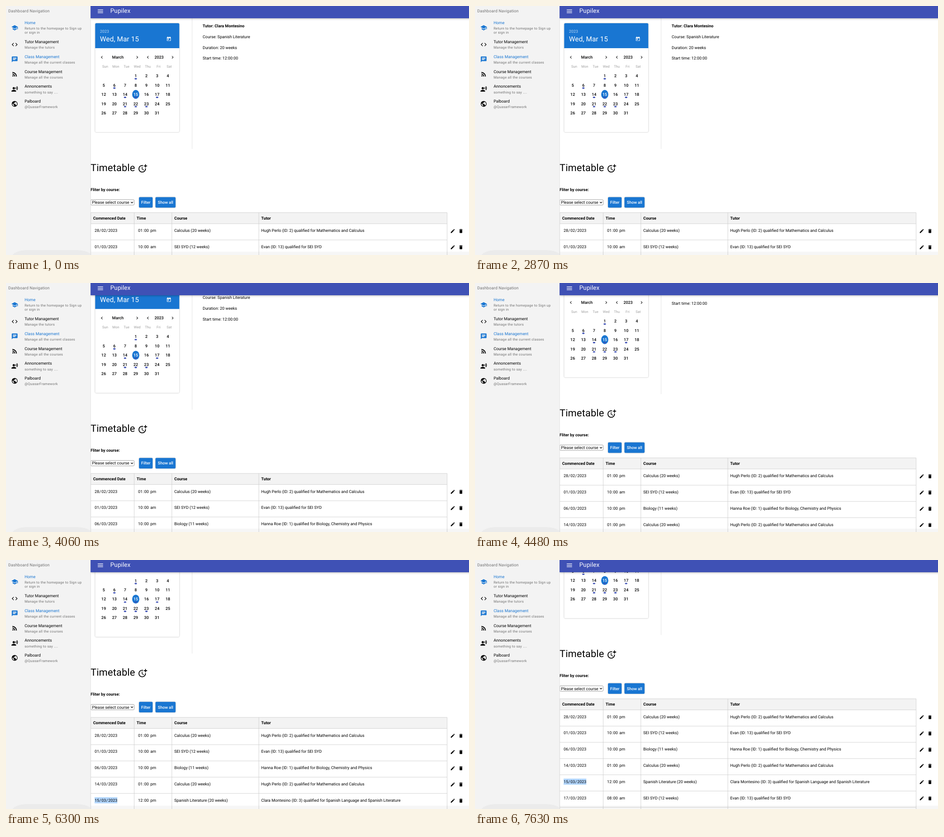
An HTML page for the animation above (8 s loop, 1020 by 549 pixels).

```html
<!DOCTYPE html>
<html lang="en">
<head>
<meta charset="utf-8">
<title>Timetable dashboard</title>
<style>
html, body { margin: 0; width: 100%; height: 100%; overflow: hidden; background: #fff; }
svg { display: block; width: 100vw; height: 100vh; }
text { font: 8.93px Roboto, Arial, sans-serif; white-space: pre; text-rendering: geometricPrecision; }
.bold { font-weight: 700; }
.medium { font-weight: 500; }
.mid { text-anchor: middle; }
.label { letter-spacing: .16px; fill-opacity: .54; }
.caption { font-size: 7.65px; letter-spacing: .255px; fill-opacity: .54; }
.weekday { font-size: 7.65px; fill-opacity: .38; }
.date { font-size: 15.31px; letter-spacing: .11px; }
.brand { font-size: 13.4px; letter-spacing: .13px; }
.title { font-size: 21.7px; letter-spacing: .16px; }
.mark { fill: rgba(128, 188, 254, .6); }
.card { filter: drop-shadow(0 .9px 1.1px rgba(0, 0, 0, .34)); }
.bar { filter: drop-shadow(0 1.2px 2px rgba(0, 0, 0, .3)); }
</style>
</head>
<body>
<svg id="stage" viewBox="0 0 1020 549" preserveAspectRatio="none"></svg>
<script>
const BLUE = '#1976d2', INDIGO = '#3f51b5', LINE = '#c9c9c9', PANEL = '#f3f3f3';
const LOOP = 8000, FRAME = 70;

const ICONS = {
  menu: 'M3 18h18v-2H3zm0-5h18v-2H3zm0-7v2h18V6z',
  school: 'M5 13.18v4L12 21l7-3.82v-4L12 17zM12 3L1 9l11 6 9-4.91V17h2V9z',
  code: 'M9.4 16.6L4.8 12l4.6-4.6L8 6l-6 6 6 6zm5.2 0l4.6-4.6-4.6-4.6L16 6l6 6-6 6z',
  chat: 'M20 2H4c-1.1 0-2 .9-2 2v18l4-4h14c1.1 0 2-.9 2-2V4c0-1.1-.9-2-2-2zM6 9h12v2H6zm8 5H6v-2h8zm4-6H6V6h12z',
  feed: 'M4 17.8a2.2 2.2 0 1 0 4.4 0a2.2 2.2 0 1 0-4.4 0zM4 4.44v2.83c7.03 0 12.73 5.7 12.73 12.73h2.83C19.56 11.4 12.6 4.44 4 4.44zm0 5.66v2.83c3.9 0 7.07 3.17 7.07 7.07h2.83c0-5.47-4.43-9.9-9.9-9.9z',
  voice: 'M5 9a4 4 0 1 0 8 0a4 4 0 1 0-8 0zM9 15c-2.67 0-8 1.34-8 4v2h16v-2c0-2.66-5.33-4-8-4zm7.76-9.64l-1.68 1.69c.84 1.18.84 2.71 0 3.89l1.68 1.69c2.02-2.02 2.02-5.07 0-7.27zM20.07 2l-1.63 1.63c2.77 3.02 2.77 7.56 0 10.74L20.07 16c3.9-3.89 3.91-9.95 0-14z',
  globe: 'M12 2C6.48 2 2 6.48 2 12s4.48 10 10 10 10-4.48 10-10S17.52 2 12 2zm-1 17.93c-3.95-.49-7-3.85-7-7.93 0-.62.08-1.21.21-1.79L9 15v1c0 1.1.9 2 2 2zm6.9-2.54c-.26-.81-1-1.39-1.9-1.39h-1v-3c0-.55-.45-1-1-1H8v-2h2c.55 0 1-.45 1-1V7h2c1.1 0 2-.9 2-2v-.41c2.93 1.19 5 4.06 5 7.41 0 2.08-.8 3.97-2.1 5.39z',
  edit: 'M3 17.25V21h3.75L17.81 9.94l-3.75-3.75zM20.71 7.04c.39-.39.39-1.02 0-1.41l-2.34-2.34c-.39-.39-1.02-.39-1.41 0l-1.83 1.83 3.75 3.75z',
  trash: 'M6 19c0 1.1.9 2 2 2h8c1.1 0 2-.9 2-2V7H6zM19 4h-3.5l-1-1h-5l-1 1H5v2h14z',
  prev: 'M15.41 7.41L14 6l-6 6 6 6 1.41-1.41L10.83 12z',
  next: 'M10 6L8.59 7.41 13.17 12l-4.58 4.59L10 18l6-6z',
  today: 'M19 3h-1V1h-2v2H8V1H6v2H5c-1.1 0-2 .9-2 2v14c0 1.1.9 2 2 2h14c1.1 0 2-.9 2-2V5c0-1.1-.9-2-2-2zm0 16H5V8h14zM7 10h5v5H7z',
  addTime: 'M10 8v6l4.7 2.9.8-1.2-4-2.4V8zM17.92 12c.05.33.08.66.08 1 0 3.9-3.1 7-7 7s-7-3.1-7-7 3.1-7 7-7c.7 0 1.37.1 2 .29V4.23C12.36 4.08 11.69 4 11 4c-5 0-9 4-9 9s4 9 9 9 9-4 9-9c0-.34-.02-.67-.06-1zM20 5V2h-2v3h-3v2h3v3h2V7h3V5z'
};

const text = (x, y, s, cls = '', fill = '#000', extra = '') =>
  `<text x="${x}" y="${y}" class="${cls}" fill="${fill}" ${extra}>${s}</text>`;
const rect = (x, y, w, h, fill, rx = 0, extra = '') =>
  `<rect x="${x}" y="${y}" width="${w}" height="${h}" rx="${rx}" fill="${fill}" ${extra}/>`;
const icon = (name, cx, cy, size, fill = '#000') =>
  `<path d="${ICONS[name]}" fill="${fill}" transform="translate(${cx - size / 2} ${cy - size / 2}) scale(${size / 24})"/>`;
const line = (x1, y1, x2, y2, color) =>
  `<path d="M${x1} ${y1}L${x2} ${y2}" stroke="${color}" stroke-width=".8"/>`;
const mark = id => `<path id="${id}" class="mark"/>`;
// date and time fields carry a little padding around each part
const fields = s => s.match(/\w+|\W/g)
  .map((part, i) => `<tspan dx="${i ? .64 : 0}">${part}</tspan>`).join('');

function calendar() {
  const events = [1, 6, 14, 15, 17, 21, 22, 23];
  let out = `<g class="card">${rect(196.5, 38, 185.3, 240, '#fff', 2.5)}</g>` +
    `<path d="M196.5 93V40.5a2.5 2.5 0 0 1 2.5-2.5h180.3a2.5 2.5 0 0 1 2.5 2.5V93z" fill="${BLUE}"/>` +
    text(207, 59.2, '2023', '', '#fff', 'fill-opacity=".7"') + mark('dateMark') +
    text(207, 78, 'Wed, Mar 15', 'date', '#fff', 'id="date"') +
    icon('today', 358.8, 72.8, 11.5, '#fff') +
    text(246.5, 116.2, 'March', 'medium mid') + text(337.3, 116.2, '2023', 'medium mid');
  [['prev', 211.2], ['next', 289], ['prev', 312.6], ['next', 367]]
    .forEach(([name, x]) => out += icon(name, x, 112.9, 12));
  'Sun Mon Tue Wed Thu Fri Sat'.split(' ')
    .forEach((d, i) => out += text(218.4 + i * 23.53, 136, d, 'weekday mid'));
  for (let day = 1; day <= 31; day++) {
    const cell = day + 2;
    const x = 215.2 + cell % 7 * 23.55, y = 154 + Math.floor(cell / 7) * 20.45;
    const chosen = day === 15;
    if (chosen) out += `<ellipse cx="${x}" cy="${y}" rx="7.9" ry="9.8" fill="${BLUE}"/>`;
    if (events.includes(day)) out += rect(x - 2.6, y + 5.1, 5.2, 2.9, INDIGO, 1.4);
    out += text(x, y + 3.2, day, 'medium mid', chosen ? '#fff' : '#000');
  }
  return out;
}

const INFO = ['Tutor: Clara Montesino', 'Course: Spanish Literature', 'Duration: 20 weeks', 'Start time: 12:00:00'];
const infoPanel = () => line(410, 0, 410, 315, '#ddd') + mark('infoMark') +
  INFO.map((s, i) => text(433.3, 47.3 + i * 23.66, s, i ? '' : 'bold', '#000', `id="info${i}"`)).join('');

const TUTORS = {
  calc: ['Calculus (20 weeks)', 'Hugh Perlo (ID: 2) qualified for Mathematics and Calculus'],
  sei: ['SEI SYD (12 weeks)', 'Evan (ID: 13) qualified for SEI SYD'],
  bio: ['Biology (11 weeks)', 'Hanna Roe (ID: 1) qualified for Biology, Chemistry and Physics'],
  span: ['Spanish Literature (20 weeks)', 'Clara Montesino (ID: 3) qualified for Spanish Language and Spanish Literature']
};
const ROWS = [
  ['28/02/2023', '01:00 pm', 'calc'], ['01/03/2023', '10:00 am', 'sei'],
  ['06/03/2023', '10:00 pm', 'bio'], ['14/03/2023', '01:00 pm', 'calc'],
  ['15/03/2023', '12:00 pm', 'span'], ['17/03/2023', '08:00 am', 'sei']
];

function timetable() {
  const button = (x, w, s) => `<g class="card">${rect(x, 421.4, w, 23.2, BLUE, 2)}</g>` +
    text(x + w / 2, 436.2, s, 'medium mid', '#fff');
  let out = text(186.3, 364, 'Timetable', 'title') + icon('addTime', 301, 358, 21.7) +
    text(186.3, 407.6, 'Fliter by course:', 'bold') +
    rect(186.8, 427, 95.6, 12, '#fff', 2, 'stroke="#767676" stroke-width=".7"') +
    text(189.5, 436.2, 'Please select course') +
    '<path d="M275.2 431.8l2.3 2.5 2.3-2.5" fill="none" stroke="#000" stroke-width="1.2"/>' +
    button(293, 30, 'Filter') + button(329.3, 44.2, 'Show all') +
    rect(186.5, 455.6, 785.3, 24.4, PANEL);
  [['Commenced Date', 192], ['Time', 287.8], ['Course', 370.8], ['Tutor', 562.2]]
    .forEach(([s, x]) => out += text(x, 470.7, s, 'bold'));
  ROWS.forEach(([day, time, kind], i) => {
    const y = 498.3 + i * 35.8, chosen = i === 4;
    const [course, tutor] = TUTORS[kind];
    out += (chosen ? mark('rowMark') : '') +
      text(195.2, y, fields(day), '', '#000', chosen ? 'id="rowDate"' : '') +
      text(291, y, fields(time)) + text(370.8, y, course) + text(562.2, y, tutor) +
      icon('edit', 984.2, y - 2.2, 11.6) + icon('trash', 1002.2, y - 2.2, 11.6);
  });
  out += line(186.5, 455.6, 971.8, 455.6, LINE);
  for (let i = 0; i <= ROWS.length; i++) {
    const y = 480 + i * 35.8;
    out += line(186.5, y, 971.8, y, LINE);
  }
  [186.7, 282.4, 365.4, 557, 971.8].forEach(x => out += line(x, 455.6, x, 730, LINE));
  return out;
}

function sidebar() {
  const items = [
    ['school', 48, 'Home', 40.2, ['Return to the homepage to Sign up', 'or sign in'], BLUE],
    ['code', 85, 'Tutor Management', 81.8, ['Manage the tutors']],
    ['chat', 117.6, 'Class Management', 115.1, ['Manage all the current classes'], BLUE],
    ['feed', 150.4, 'Course Management', 147.8, ['Manage all the courses']],
    ['voice', 183.1, 'Annoncements', 180.4, ['something to say ....']],
    ['globe', 215.8, 'Palboard', 213.1, ['@QuasarFramework']]
  ];
  let out = rect(0, 0, 186.4, 549, PANEL) + line(186.3, 27, 186.3, 549, '#ddd') +
    '<path d="M14 549Q24 538.3 46 538.3H156Q176 538.6 186 546V549z" fill="#ebebeb"/>' +
    text(5, 14, 'Dashboard Navigation', 'label');
  items.forEach(([name, iy, title, y, notes, color = '#000']) => {
    out += icon(name, 19.1, iy, 15.3, color) + text(40.9, y, title, '', color);
    notes.forEach((s, i) => out += text(40.9, y + 12.1 + i * 8.9, s, 'caption'));
  });
  return out;
}

const stage = document.getElementById('stage');
stage.innerHTML = rect(0, 0, 1020, 549, '#fff') +
  `<g id="page">${infoPanel()}${calendar()}${timetable()}</g>` +
  rect(186.4, 541.6, 834, 8, '#000', 0, 'fill-opacity=".035"') +
  `<g class="bar">${rect(186.4, -6, 840, 33, INDIGO)}</g>` + sidebar() +
  rect(186.4, 0, 834, 27, INDIGO) +
  icon('menu', 208, 11.6, 15.6, '#fff') + text(229.8, 15.4, 'Pupilex', 'brand', '#fff');

const $ = id => document.getElementById(id);

// scroll bursts: start, steps, end position
const BURSTS = [[3290, 8, 35], [4060, 2, 36.2], [4340, 3, 70], [4620, 4, 106], [5180, 2, 108.6], [7140, 8, 149.6]];
const glide = p => 1 - (1 - p ** 1.5) ** 2;

function scrollAt(t) {
  let y = 0;
  for (const [start, steps, end] of BURSTS) {
    if (t < start) break;
    const step = Math.min(steps, Math.floor((t - start) / FRAME) + 1);
    y += (end - y) * glide(step / steps);
  }
  return y;
}

// selections grow backwards: [time, first selected character]
const DATE_DRAG = [[70, 9], [140, 6], [210, 2], [490, 1], [560, 0], [1680, -1]];
const ROW_DRAG = [[6020, 6], [6090, 2], [6230, 1], [6300, 0]];
const INFO_DRAG = [[1820, 3, 11], [1890, 3, 2], [1960, 2, 4], [2030, 1, 5], [2100, 0, 4], [2170, 0, 0], [2870, 9, 0]];
const latest = (keys, t) => keys.filter(k => k[0] <= t).pop();

function span(el, from, top, height) {
  const x = el.getStartPositionOfChar(from).x;
  const end = el.getEndPositionOfChar(el.getNumberOfChars() - 1).x;
  return `M${x} ${top}H${end}v${height}H${x}z`;
}

function drag(markId, textId, keys, t, top, height) {
  const key = latest(keys, t);
  $(markId).setAttribute('d', key && key[1] >= 0 ? span($(textId), key[1], top, height) : '');
}

function draw(t) {
  $('page').setAttribute('transform', `translate(0 ${-scrollAt(t)})`);
  drag('dateMark', 'date', DATE_DRAG, t, 64.2, 18.4);
  drag('rowMark', 'rowDate', ROW_DRAG, t, 631.7, 13.4);
  const [, first, from] = latest(INFO_DRAG, t) || [0, 9, 0];
  $('infoMark').setAttribute('d', INFO.map((s, i) => i < first ? '' :
    span($('info' + i), i === first ? from : 0, 37.4 + i * 23.66, 13.4)).join(''));
}

const began = performance.now();
function tick() {
  draw((performance.now() - began) % LOOP);
  requestAnimationFrame(tick);
}
tick();
</script>
</body>
</html>
```
